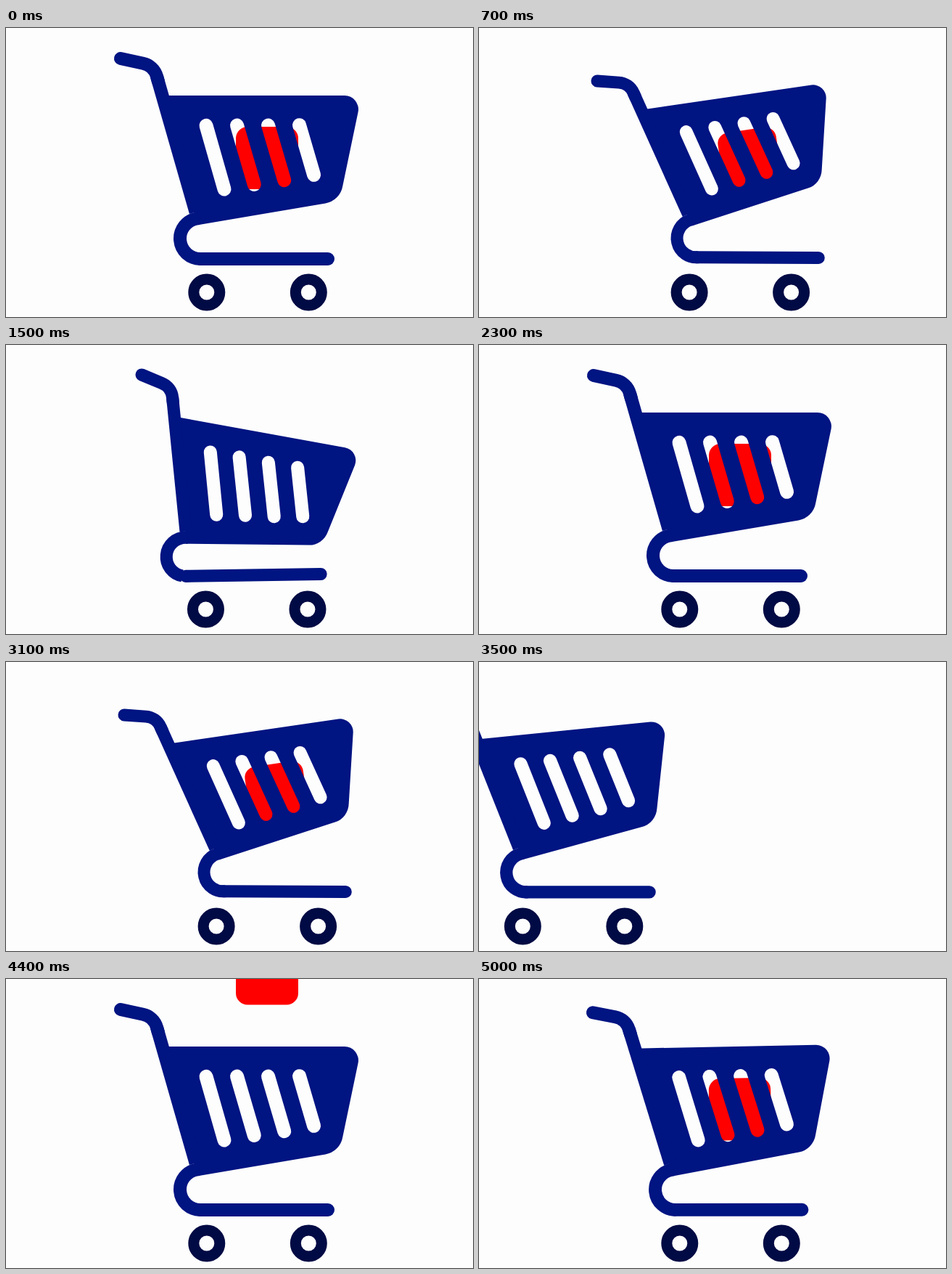
An HTML page for the animation above (5.1 s loop, 644 px wide and 398 px high).

```html
<!DOCTYPE html>
<html lang="en">
<head>
<meta charset="utf-8">
<title>Shopping cart</title>
<style>
  html, body { margin: 0; width: 100%; height: 100%; overflow: hidden; background: #fdfdfd; }
  svg { display: block; width: 100vw; height: 100vh; }
  .tube { fill: none; stroke: #001482; stroke-width: 18; }
  .round { stroke-linecap: round; }
</style>
</head>
<body>
<svg viewBox="0 0 644 398">
  <defs>
    <mask id="slots" maskUnits="userSpaceOnUse" x="100" y="0" width="450" height="398">
      <rect x="100" width="450" height="398" fill="#fff"/>
      <path d="M276 134.3L301 222M318.5 134L342.3 215.5M361.5 134L383.7 209.7M404.5 133.7L424.6 202.3"
            stroke="#000" stroke-width="19" stroke-linecap="round"/>
    </mask>
  </defs>
  <g id="cart">
    <rect id="item" x="-43" y="-43" width="86" height="86" rx="16" fill="#f00"/>
    <g id="body">
      <g mask="url(#slots)">
        <path fill="#001482" d="M215.5 93H467A19 19 0 0 1 485.6 115.5L464.3 217.5A29 29 0 0 1 440.5 241.4L264.8 271.3L260 254Z"/>
        <path class="tube" d="M207.9 66.4L261.6 253.6"/>
      </g>
      <path class="tube round" d="M158 42L189.1 48.8A25 25 0 0 1 207.9 66.4L210 73.7"/>
      <path class="tube" d="M266 261.9L263.3 262.4A28 28 0 0 0 268 318"/>
    </g>
    <path id="bar" class="tube round"/>
    <g fill="none" stroke="#000a44" stroke-width="15">
      <circle cx="276.8" cy="364" r="18"/>
      <circle cx="417.3" cy="364" r="18"/>
    </g>
  </g>
</svg>
<script>
const LOOP = 5100, CYCLE = 2400, STEP = 100;
const $ = id => document.getElementById(id);
const cart = $('cart'), item = $('item'), body = $('body'), bar = $('bar');

// Handle tip, tilt, scale and tray end for each pose
const REST  = { x: 158,   y: 42, a: 0,    s: 1,    bx: 444,   by: 318 };
const BACK  = { x: 149.7, y: 73, a: -8.3, s: .943, bx: 455,   by: 316.4 };
const FRONT = { x: 188.4, y: 41, a: 10.3, s: .951, bx: 435.4, by: 315.5 };

const part = (t, from, to) => Math.min(1, Math.max(0, (t - from) / (to - from)));
const smooth = u => u * u * (3 - 2 * u);

// -1 leans back, 1 leans forward
function lean(t) {
  const u = part(t, 0, 550);
  if (t < 1000) return -(u + smooth(u)) / 2;
  if (t < 1500) return 2 * smooth(part(t, 1000, 1400)) - 1;
  return 1 - smooth(part(t, 1500, 1900));
}

// Speeds off to the right, then brakes in from the left
function drive(t) {
  if (t < 945) return 13.3 * (Math.max(0, t - 600) / 100) ** 3;
  return -1.84 * (Math.max(0, 1590 - t) / 100) ** 3;
}

function draw(t) {
  const p = lean(t), k = Math.abs(p), end = p < 0 ? BACK : FRONT;
  const mix = {};
  for (const key in REST) mix[key] = REST[key] + (end[key] - REST[key]) * k;
  const { x, y, a, s, bx, by } = mix;

  cart.setAttribute('transform', `translate(${drive(t)} 0)`);
  body.setAttribute('transform', `translate(${x} ${y}) rotate(${a}) scale(${s}) translate(-158 -42)`);

  // The tray stays level below the bend, whose centre turns with the basket
  const r = a * Math.PI / 180;
  const ux = x + s * (110 * Math.cos(r) - 248 * Math.sin(r));
  const uy = y + s * (110 * Math.sin(r) + 248 * Math.cos(r));
  bar.setAttribute('d', `M${ux} ${uy + 28 * s}L${bx} ${by}`);
  bar.style.strokeWidth = 18 * s;

  const drop = t < 945 ? 0 : 222 * (part(t, 1800, 2300) ** 2 - 1);
  item.style.display = t >= 945 && t <= 1800 ? 'none' : '';
  item.setAttribute('transform', p > 0 ? `translate(360 ${179 + drop})`
    : `translate(360 ${179 + 1.6 * k + drop}) rotate(${a}) scale(${s})`);
}

function tick(now) {
  const t = Math.floor(now % LOOP / STEP) * STEP;
  // Two cycles, a short rest, then the next one begins
  draw(t < 2 * CYCLE ? t % CYCLE : Math.max(0, t - 2 * CYCLE - STEP));
  requestAnimationFrame(tick);
}
tick(performance.now());
</script>
</body>
</html>
```
